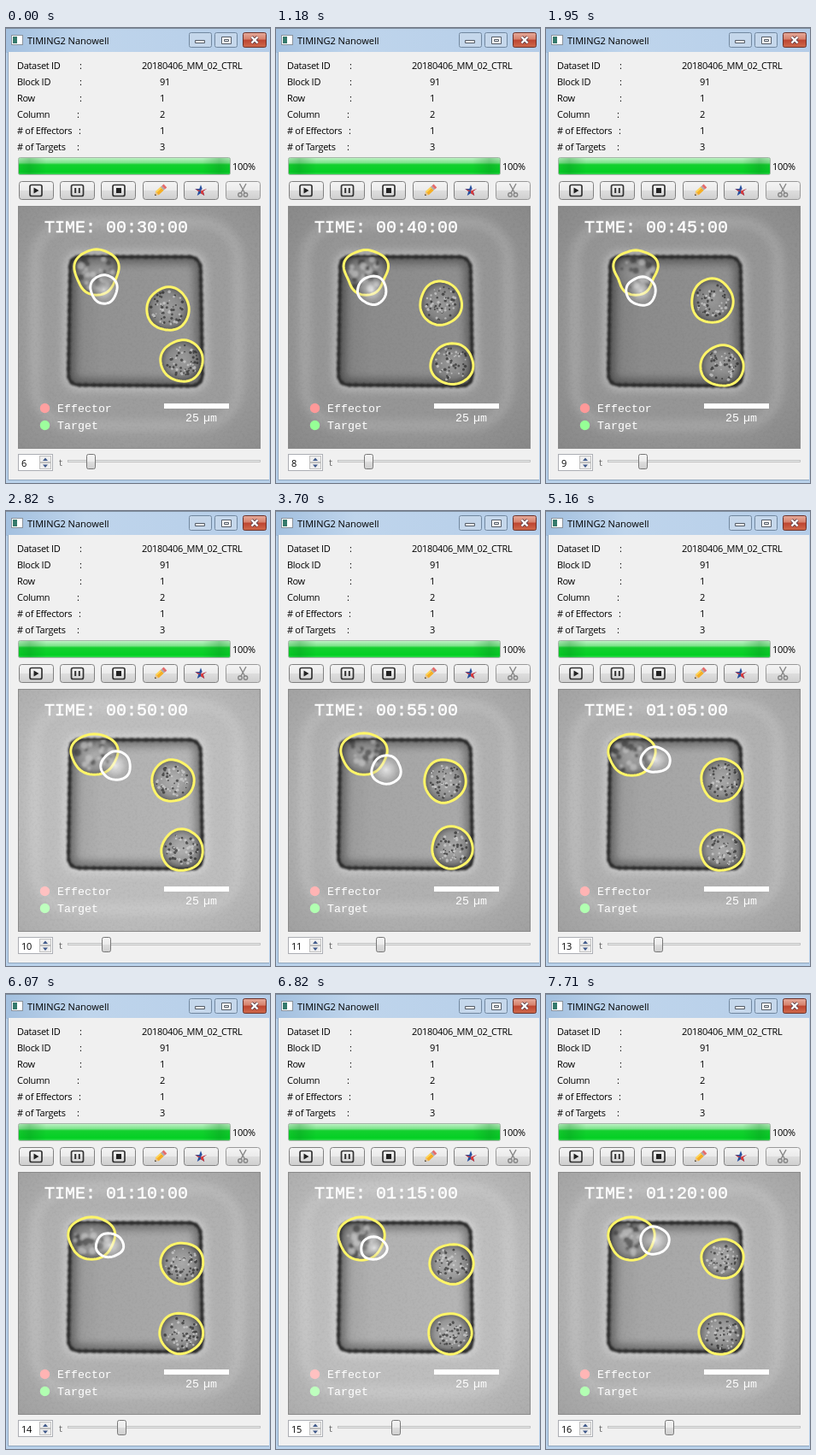
Animation of 309 by 532 pixels, one loop 8000 ms. Source, as an HTML page:

```html
<!DOCTYPE html>
<html lang="en">
<head>
<meta charset="utf-8">
<title>TIMING2 Nanowell</title>
<style>
html, body { margin: 0; width: 100%; height: 100%; overflow: hidden; }
svg { display: block; width: 100%; height: 100%; }
.ui { font: 11px "Open Sans", "Noto Sans", sans-serif; letter-spacing: -.3px; fill: #000; }
.title { letter-spacing: 0; }
.mono { font-family: "Liberation Mono", monospace; fill: #fff; }
</style>
</head>
<body>
<svg viewBox="0 0 309 532" preserveAspectRatio="none">
  <defs>
    <linearGradient id="bar" x2="1" y2="0">
      <stop stop-color="#a3c0df"/><stop offset=".3" stop-color="#bfd5ec"/><stop offset="1" stop-color="#b5cde8"/>
    </linearGradient>
    <linearGradient id="btn" x2="0" y2="1">
      <stop stop-color="#f4f4f4"/><stop offset=".48" stop-color="#ebebeb"/>
      <stop offset=".52" stop-color="#dddddd"/><stop offset="1" stop-color="#cfcfcf"/>
    </linearGradient>
    <linearGradient id="close" x2="0" y2="1">
      <stop stop-color="#e6ab9c"/><stop offset=".45" stop-color="#d6816c"/>
      <stop offset=".5" stop-color="#bd4430"/><stop offset="1" stop-color="#cf6a4c"/>
    </linearGradient>
    <linearGradient id="green" x2="0" y2="1">
      <stop stop-color="#c4f3ca"/><stop offset=".3" stop-color="#7de38b"/><stop offset=".42" stop-color="#14d02f"/>
      <stop offset=".85" stop-color="#04d024"/><stop offset="1" stop-color="#40dc5a"/>
    </linearGradient>
    <linearGradient id="ends" x2="1" y2="0">
      <stop stop-color="#087c1c" stop-opacity=".1"/><stop offset=".05" stop-color="#087c1c" stop-opacity=".28"/>
      <stop offset=".13" stop-color="#087c1c" stop-opacity="0"/><stop offset=".87" stop-color="#087c1c" stop-opacity="0"/>
      <stop offset=".95" stop-color="#087c1c" stop-opacity=".28"/><stop offset="1" stop-color="#087c1c" stop-opacity=".1"/>
    </linearGradient>
    <linearGradient id="shade" x2="1" y2="0">
      <stop stop-opacity=".12"/><stop offset=".25" stop-opacity=".03"/><stop offset="1" stop-opacity="0"/>
    </linearGradient>
    <radialGradient id="edge" cx=".5" cy=".48" r=".74">
      <stop offset=".6" stop-opacity="0"/><stop offset="1" stop-opacity=".1"/>
    </radialGradient>
    <radialGradient id="body">
      <stop stop-color="#aaa" stop-opacity=".35"/><stop offset=".7" stop-color="#777" stop-opacity=".5"/>
      <stop offset="1" stop-color="#333" stop-opacity=".6"/>
    </radialGradient>
    <radialGradient id="glow">
      <stop stop-color="#fff" stop-opacity=".7"/><stop offset=".5" stop-color="#eee" stop-opacity=".35"/>
      <stop offset="1" stop-color="#888" stop-opacity=".2"/>
    </radialGradient>
    <filter id="soft"><feGaussianBlur stdDeviation=".45"/></filter>
    <filter id="blur1"><feGaussianBlur stdDeviation="1"/></filter>
    <filter id="blur5" x="-20%" y="-20%" width="140%" height="140%"><feGaussianBlur stdDeviation="5"/></filter>
    <filter id="grain" x="0" y="0" width="1" height="1">
      <feTurbulence type="fractalNoise" baseFrequency=".35" numOctaves="2" seed="7"/>
      <feColorMatrix values="0 0 0 0 0  0 0 0 0 0  0 0 0 0 0  1.2 0 0 0 -.52"/>
    </filter>
    <clipPath id="view"><rect x="15" y="209" width="282" height="282"/></clipPath>
    <path id="well" d="M86 267.500H214Q227 268 228 282L230 405Q229 418 217 418.500L86 417.500Q73 417 73 404L75 280Q75 268 86 267.500Z"/>
    <clipPath id="inWell"><use href="#well"/></clipPath>
  </defs>

  <rect width="309" height="532" fill="#b9d1ea"/>
  <rect width="309" height="29" fill="url(#bar)"/>
  <path d="M0 .5H309" stroke="#7d8b9a"/>
  <rect x="3" y="28" width="305" height="500" fill="#f0f0f0"/>
  <path d="M2.500 28V528.500H308" fill="none" stroke="#8fa5bd"/>
  <rect x="6.500" y="8.500" width="13" height="11" fill="#fff" stroke="#8a939c"/>
  <path d="M8 10h5v8H8z" fill="#357a6c"/>
  <text x="25" y="19" class="ui title">TIMING2 Nanowell</text>
  <g stroke="#71879f">
    <rect x="214.500" y="5.500" width="26" height="17" rx="2" fill="#c5d7eb"/>
    <rect x="244.500" y="5.500" width="26" height="17" rx="2" fill="#c5d7eb"/>
    <rect x="277.500" y="5.500" width="27" height="17" rx="2" fill="url(#close)" stroke="#6b3028"/>
    <path d="M221.500 14.500h11v3h-11zM252.500 10.500h11v8h-11zM255.500 13.500h5v2h-5z" fill="#fff" stroke="#535b66"/>
    <path d="M287.500 10.500l7 7M294.500 10.500l-7 7" stroke="#60434a" stroke-width="4"/>
    <path d="M287.500 10.500l7 7M294.500 10.500l-7 7" stroke="#fff" stroke-width="2.400"/>
  </g>

  <g id="info"></g>
  <rect x="14.500" y="151.500" width="248" height="20" rx="2" fill="url(#green)" stroke="#a5b5a7"/>
  <rect x="15" y="152" width="247" height="19" fill="url(#ends)"/>
  <text class="ui" x="265" y="166">100%</text>

  <g id="buttons"></g>
  <g fill="none" stroke="#333" stroke-width="1.700">
    <rect x="28" y="183.500" width="14" height="13" rx="2"/>
    <rect x="76.500" y="183.500" width="14" height="13" rx="2"/>
    <rect x="125" y="183.500" width="14" height="13" rx="2"/>
    <path d="M81.200 187v6M85.800 187v6" stroke-width="2"/>
  </g>
  <path d="M32.500 186.500v7l6-3.500zM129 187h6v6h-6z" fill="#222"/>
  <g transform="translate(174 196) rotate(-43)">
    <path d="M0 0l4-2.700v5.400z" fill="#e7c28f"/><path d="M0 0l1.700-1.100v2.200z" fill="#333"/>
    <path d="M4-2.700h8v5.400h-8z" fill="#f5ae25"/><path d="M4-2.700h8v1.800h-8z" fill="#ffd75c"/>
    <path d="M12-2.700h2v5.400h-2z" fill="#aaa"/><path d="M14-2.700h3v5.400h-3z" fill="#e46b6b"/>
  </g>
  <g transform="translate(228 190.500) scale(.85)">
    <path d="M0-8.500l2 5.500 6 .2-4.700 3.500L5 6.500 0 3.100-5 6.500l1.700-5.800L-8-2.800l6-.2z" fill="#284f9e"/>
    <path d="M0 0l3.300.7L5 6.500 0 3.100zM0 0l-3.300.7L-8-2.800zM0 0l2-3 6 .2-4.700 3.500z" fill="#d73b3b"/>
    <path d="M0 0l2-3 6 .2z" fill="#e8e8f0"/>
  </g>
  <g fill="none" stroke="#858585" stroke-width="1.400">
    <path d="M273.500 182l6 11M281 182l-6 11"/>
    <circle cx="274" cy="195" r="2.200"/><circle cx="280.500" cy="195" r="2.200"/>
  </g>

  <rect x="14.500" y="208.500" width="283" height="283" fill="none" stroke="#8a8a8a"/>
  <g clip-path="url(#view)">
    <rect id="bg" x="15" y="209" width="282" height="282"/>
    <rect x="15" y="209" width="282" height="282" fill="url(#edge)"/>
    <rect x="34" y="227" width="238" height="238" rx="46" fill="none" stroke="#fff" stroke-width="13" opacity=".14" filter="url(#blur5)"/>
    <use href="#well" fill="none" stroke="#fff" stroke-width="14" opacity=".3" filter="url(#blur5)"/>
    <use href="#well" id="floor"/>
    <use href="#well" fill="url(#shade)"/>
    <g clip-path="url(#inWell)">
      <use href="#well" fill="none" stroke="#000" stroke-width="16" opacity=".32" filter="url(#blur5)"/>
    </g>
    <g fill="none" stroke="#2c2c2c" filter="url(#blur1)">
      <use href="#well" stroke-width="3.400"/>
      <use href="#well" stroke-width="4.600" stroke-linecap="round" stroke-dasharray="1 8 2 6"/>
    </g>
    <rect x="15" y="209" width="282" height="282" filter="url(#grain)" opacity=".07"/>
    <g id="cells"></g>
    <text id="clock" class="mono" x="45" y="239" font-size="20" stroke="#fff" stroke-width=".5"></text>
    <circle id="dotE" cx="45.500" cy="444.500" r="5.700"/>
    <circle id="dotT" cx="45.500" cy="464.500" r="5.700"/>
    <text class="mono" x="60" y="449" font-size="13.300">Effector</text>
    <text class="mono" x="60" y="469" font-size="13.300">Target</text>
    <rect x="185" y="439" width="76" height="6" fill="#fff"/>
    <text class="mono" x="210" y="460" font-size="13.300" word-spacing="-3">25 µm</text>
  </g>

  <rect x="14.500" y="498.500" width="40" height="19" fill="#fff" stroke="#abadb3"/>
  <g fill="#eee" stroke="#c0c0c0">
    <rect x="39.500" y="500.500" width="13" height="7"/><rect x="39.500" y="508.500" width="13" height="7"/>
  </g>
  <path d="M43 506l3-3.500 3 3.500zM43 510.500l3 3.500 3-3.500z" fill="#40598a"/>
  <text class="ui" id="count" x="18" y="513"></text>
  <text class="ui" x="62" y="512" style="fill:#666">t</text>
  <rect x="72.500" y="505.500" width="225" height="2" fill="#e7eaea" stroke="#b8b8b8" stroke-width=".8"/>
  <rect id="thumb" y="498.500" width="10" height="17" rx="2" fill="url(#btn)" stroke="#777"/>
</svg>
<script>
const LOOP = 8000, FIRST = 6;
const STARTS = [0, 430, 1180, 1950, 2820, 3700, 4440, 5160, 6070, 6820, 7710];
const LIGHT = [157, 162, 150, 150, 190, 177, 186, 177, 177, 190, 179];
const KEYS = [0, 3, 4, 5, 7, 9, 10];

// Bounds per key step: left, top, right, bottom.
const CELLS = [
  { color: "#fff568", target: true, corner: true, bend: .035, boxes: [
    [79, 258, 133, 313], [78, 259, 132, 313], [75, 260, 132, 309], [75, 259, 131, 309],
    [72, 260, 129, 310], [72, 260, 128, 312], [72, 260, 128, 312]] },
  { color: "#fff568", target: true, bend: .02, boxes: [
    [164, 302, 215, 354], [170, 292, 220, 345], [170, 290, 221, 340], [173, 290, 223, 342],
    [181, 289, 231, 340], [179, 292, 232, 340], [181, 286, 232, 333]] },
  { color: "#fff568", target: true, bend: .02, boxes: [
    [180, 364, 231, 414], [180, 370, 232, 419], [181, 371, 231, 421], [182, 368, 231, 419],
    [180, 372, 233, 421], [178, 373, 230, 422], [178, 373, 232, 422]] },
  { color: "#fff", bend: .03, boxes: [
    [98, 288, 131, 323], [93, 290, 129, 325], [110, 280, 146, 315], [111, 285, 147, 320],
    [110, 275, 146, 306], [99, 283, 131, 311], [110, 271, 145, 305]] }
];

const $ = id => document.getElementById(id);
const gray = v => `rgb(${v},${v},${v})`;
const pad = n => String(n).padStart(2, "0");

function random(seed) {
  let s = seed * 7919 + 17;
  return () => (s = (s * 16807) % 2147483647) / 2147483647;
}

function boxAt(boxes, step) {
  const k = KEYS.findIndex(v => v >= step);
  if (KEYS[k] === step) return boxes[k];
  const p = (step - KEYS[k - 1]) / (KEYS[k] - KEYS[k - 1]);
  return boxes[k].map((v, i) => boxes[k - 1][i] * (1 - p) + v * p);
}

function blob([l, t, r, b], bend, turn) {
  const inset = .8;
  const pts = Array.from({ length: 60 }, (_, i) => {
    const a = i * Math.PI / 30;
    const q = 1 + bend * Math.cos(3 * (a - turn)) + bend * .4 * Math.cos(5 * a + turn);
    return [q * Math.cos(a), q * Math.sin(a)];
  });
  const fit = (axis, lo, hi) => {
    const all = pts.map(p => p[axis]), min = Math.min(...all), max = Math.max(...all);
    return v => lo + inset + (v - min) / (max - min) * (hi - lo - 2 * inset);
  };
  const fx = fit(0, l, r), fy = fit(1, t, b);
  return "M" + pts.map(p => fx(p[0]).toFixed(1) + " " + fy(p[1]).toFixed(1)).join("L") + "Z";
}

function specks([l, t, r, b], corner, rnd) {
  let out = "";
  for (let i = 0; i < (corner ? 22 : 60); i++) {
    const a = rnd() * 2 * Math.PI, d = Math.sqrt(rnd()) * .39;
    const x = (l + r) / 2 + Math.cos(a) * d * (r - l), y = (t + b) / 2 + Math.sin(a) * d * (b - t);
    const size = corner ? 1.5 + rnd() * 3 : .8 + rnd();
    const fill = rnd() < .55 ? "#1c1c1c" : "#ddd";
    out += `<circle cx="${x.toFixed(1)}" cy="${y.toFixed(1)}" r="${size.toFixed(1)}" fill="${fill}"/>`;
  }
  return `<g filter="url(#${corner ? "blur1" : "soft"})" opacity="${corner ? .45 : .6}">${out}</g>`;
}

function drawCell(cell, n, step) {
  const rnd = random(step * 5 + n + 1), box = boxAt(cell.boxes, step);
  const pointed = cell.corner && step < 4;
  const turn = cell.corner ? Math.PI / 2 : rnd() * 6;
  const d = blob(box, pointed ? .05 + step * .012 : cell.bend, turn);
  const inside = `<path d="${d}" fill="url(#${cell.target ? "body" : "glow"})"/>`;
  const texture = cell.target ? specks(box, cell.corner, rnd) : "";
  const clip = cell.corner ? ' clip-path="url(#inWell)"' : "";
  return `<g${clip}>${inside}${texture}</g><path d="${d}" fill="none" stroke="${cell.color}" stroke-width="3"/>`;
}

function draw(step) {
  const light = LIGHT[step], t = FIRST + step, min = t * 5;
  $("bg").setAttribute("fill", gray(light));
  $("floor").setAttribute("fill", gray(Math.round(light * .96)));
  $("dotE").setAttribute("fill", `rgb(255,${light + 3},${light + 3})`);
  $("dotT").setAttribute("fill", `rgb(${light},255,${light})`);
  $("cells").innerHTML = CELLS.map((c, n) => drawCell(c, n, step)).join("");
  $("clock").textContent = `TIME: ${pad(Math.floor(min / 60))}:${pad(min % 60)}:00`;
  $("count").textContent = t;
  $("thumb").setAttribute("x", 94 + Math.round(step * 4.5) + .5);
}

const ROWS = [["Dataset ID", 86, "20180406_MM_02_CTRL", 48], ["Block ID", 86, "91", 67], ["Row", 86, "1", 86],
  ["Column", 83, "2", 105], ["# of Effectors", 85, "1", 124], ["# of Targets", 83, "3", 143]];
$("info").innerHTML = ROWS.map(([name, colon, value, y]) =>
  `<text class="ui" x="13" y="${y}">${name}</text><text class="ui" x="${colon}" y="${y}">:</text>` +
  `<text class="ui" x="${value.length > 2 ? 159 : 180}" y="${y}">${value}</text>`).join("");
$("buttons").innerHTML = Array.from({ length: 6 }, (_, i) =>
  `<rect x="${Math.floor(15 + i * 48.4) + .5}" y="179.5" width="40" height="21" rx="3" ` +
  `fill="url(#btn)" stroke="${i < 5 ? "#808080" : "#999"}"/>`).join("");

const origin = performance.now();
let shown = -1;
function tick() {
  const time = (performance.now() - origin) % LOOP;
  const step = STARTS.filter(s => s <= time).length - 1;
  if (step !== shown) draw(shown = step);
  requestAnimationFrame(tick);
}
tick();
</script>
</body>
</html>
```
